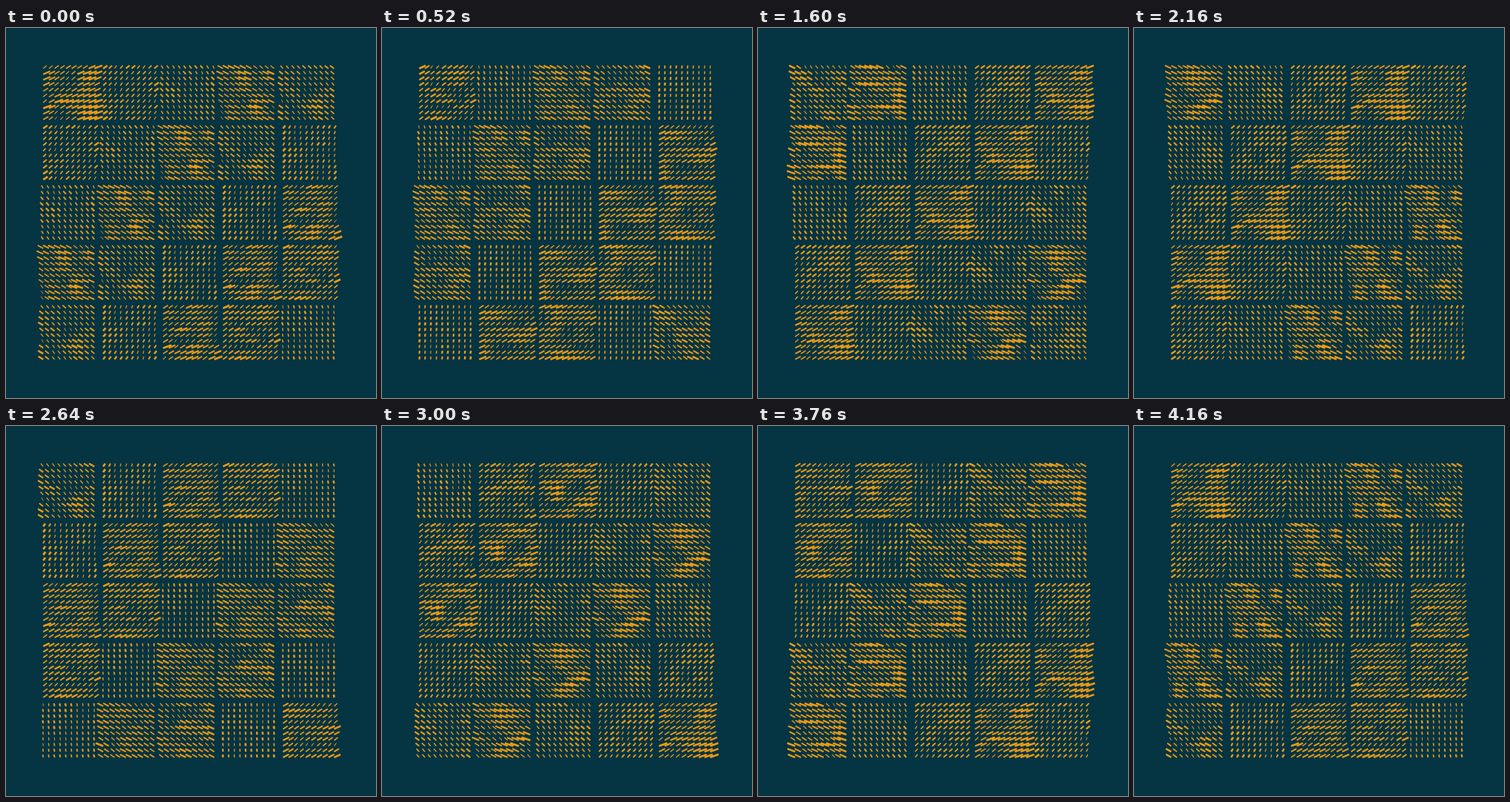
An HTML page with a canvas that plays this animation: 500x500 px, repeating every 4.2 s.

```html
<!DOCTYPE html>
<html lang="en">
<head>
<meta charset="utf-8">
<title>Swaying sticks</title>
<style>
  html, body { margin: 0; width: 100%; height: 100%; overflow: hidden; background: #053443; }
  canvas { display: block; width: 100vmin; height: 100vmin; }
</style>
</head>
<body>
<canvas id="stage" width="500" height="500"></canvas>
<script>
const ctx = document.getElementById('stage').getContext('2d');
const LOOP = 4200, STEP = 40, TAU = Math.PI * 2;
const BLOCKS = 5, STICKS = 10;
const ORIGIN = 50.3, BLOCK_PITCH = 81, STICK_PITCH = 7.68, RISE = 4;

// Seeded pseudo-random value in 0..1 for an integer lattice point.
function hash(point) {
  let h = 1013;
  for (const n of point) {
    h = Math.imul(h ^ (n + 101), 0x5bd1e995);
    h ^= h >>> 15;
  }
  h = Math.imul(h, 0x27d4eb2d);
  return ((h ^ (h >>> 13)) >>> 0) / 4294967296;
}

// Smooth value noise in any number of dimensions.
function noise(coords, lattice = []) {
  const axis = lattice.length;
  if (axis === coords.length) return hash(lattice);
  const base = Math.floor(coords[axis]);
  const f = coords[axis] - base;
  const s = f * f * (3 - 2 * f);
  const a = noise(coords, [...lattice, base]);
  const b = noise(coords, [...lattice, base + 1]);
  return a + (b - a) * s;
}

// All blocks on the same anti-diagonal share one phase and so one pattern.
function makePattern(phase) {
  const sway = Math.cos(phase);
  const u = 4 * Math.cos(phase), v = 4 * Math.sin(phase);
  const sticks = [];
  for (let row = 0; row < STICKS; row++) {
    for (let col = 0; col < STICKS; col++) {
      const n = noise([col * 0.45, row * 0.7, u, v]);
      sticks.push({
        x: col * STICK_PITCH,
        y: row * STICK_PITCH,
        lean: sway * (2 + 11 * n),
        weight: 0.7 + 2.2 * n
      });
    }
  }
  return sticks;
}

function drawBlock(left, top, sticks) {
  for (const { x, y, lean, weight } of sticks) {
    ctx.lineWidth = weight;
    ctx.beginPath();
    ctx.moveTo(left + x, top + y + RISE);
    ctx.lineTo(left + x + lean, top + y);
    ctx.stroke();
  }
}

function render(time) {
  const angle = TAU * time / LOOP;
  ctx.fillStyle = '#053443';
  ctx.fillRect(0, 0, 500, 500);
  ctx.strokeStyle = '#f39c12';
  const patterns = Array.from({ length: 2 * BLOCKS - 1 }, (_, k) => makePattern(angle + k));
  for (let row = 0; row < BLOCKS; row++) {
    for (let col = 0; col < BLOCKS; col++) {
      drawBlock(ORIGIN + col * BLOCK_PITCH, ORIGIN + 0.4 + row * BLOCK_PITCH, patterns[row + col]);
    }
  }
}

const start = performance.now();
let shown = -1;
function tick() {
  const elapsed = (performance.now() - start) % LOOP;
  const time = Math.floor(elapsed / STEP) * STEP;
  if (time !== shown) render(shown = time);
  requestAnimationFrame(tick);
}
tick();
</script>
</body>
</html>
```
